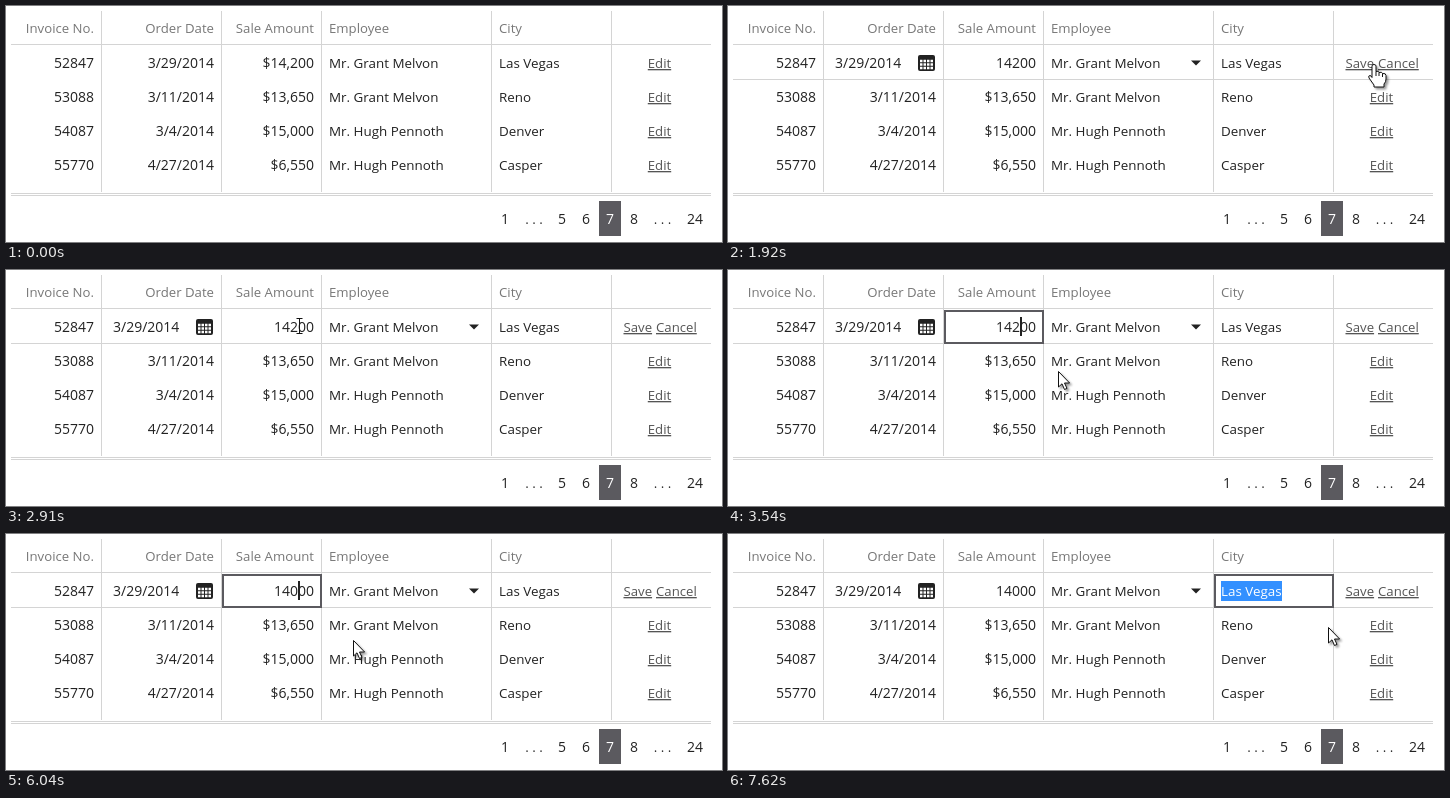
Write an HTML page that moves like this. It is 716 px wide and 236 px high and loops after 8 s.

```html
<!DOCTYPE html>
<html lang="en">
<head>
<meta charset="utf-8">
<title>Invoice grid</title>
<style>
html, body { margin: 0; width: 100%; height: 100%; overflow: hidden; background: #fff; }
svg { display: block; font: 13.4px "Open Sans", "Noto Sans", sans-serif; fill: #222; }
.num { font-size: 14px; }
.head { font-size: 13.2px; fill: #777; }
.link { font-size: 13.2px; fill: #555; text-decoration: underline 1px; text-underline-offset: 2px; }
.end { text-anchor: end; }
.mid { text-anchor: middle; }
.white { fill: #fff; }
.line { fill: none; stroke: #d4d4d4; shape-rendering: crispEdges; }
#focus { fill: none; stroke: #5b5a5f; stroke-width: 2; }
#cursor path { fill: #fff; stroke: #111; stroke-linejoin: round; }
#arrow, #hand { filter: drop-shadow(2px 2px 1px rgba(0, 0, 0, .4)); }
#cursor #beam { fill: none; }
</style>
</head>
<body>
<svg width="716" height="236" viewBox="0 0 716 236">
  <defs><clipPath id="clip"><rect id="clipBox" y="47" height="20"/></clipPath></defs>
  <path class="line" d="M95.5 5V186M215.5 5V186M315.5 5V186M485.5 5V186M605.5 5V186M5 38.5H705M5 187.5H705M5 189.5H705"/>
  <rect x="593" y="195" width="22" height="35" fill="#5b5a5f"/>
  <g id="table"></g>
  <g id="view"></g>
  <g id="edit">
    <path class="line" d="M5 73.5H705"/>
    <rect x="190" y="49" width="17" height="16" rx="2"/>
    <path d="M192 55h13M192 58.5h13M192 62h13" stroke="#fff" stroke-width="2.5" stroke-dasharray="2.5 1"/>
    <path d="M463 54.5h10l-5 5z"/>
  </g>
  <g id="selection" clip-path="url(#clip)">
    <rect x="493" y="47" width="61" height="20" fill="#3390ff"/>
  </g>
  <rect id="focus" y="41" height="32"/>
  <rect id="caret" x="292" y="47" width="2" height="19"/>
  <g id="cursor">
    <path id="arrow" d="M.5.5V16L4 12.8L6.5 18.5L9 17.4L6.5 12H11.6Z"/>
    <path id="hand" d="M-2 2Q-2 .5 0 .5T2 2V7.5Q5 6.5 5 8.5Q8 7.5 8.5 9.5Q12 9 12 11.5V15Q12 18 10 20V23H0V21L-5 14Q-6 11.5-4 11.5Q-3 11.5-2 13.5ZM2 7.5V12M5 8.5V12M8.5 9.5V13"/>
    <path id="beam" d="M-3-7.5H3M0-7.5V7.5M-3 7.5H3"/>
  </g>
</svg>
<script>
const $ = id => document.getElementById(id);

function text(parent, str, x, y, cls = '') {
  const el = document.createElementNS('http://www.w3.org/2000/svg', 'text');
  set(el, { x, y, class: cls });
  el.textContent = str;
  return $(parent).appendChild(el);
}
function set(el, attrs) {
  for (const name in attrs) el.setAttribute(name, attrs[name]);
}
const show = (id, on) => $(id).style.display = on ? '' : 'none';

text('table', 'Invoice No.', 88, 27, 'head end');
text('table', 'Order Date', 208, 27, 'head end');
text('table', 'Sale Amount', 308, 27, 'head end');
text('table', 'Employee', 323, 27, 'head');
text('table', 'City', 493, 27, 'head');

const grant = 'Mr. Grant Melvon', hugh = 'Mr. Hugh Pennoth';
[
  ['52847', '3/29/2014', '$14,200', grant, 'Las Vegas'],
  ['53088', '3/11/2014', '$13,650', grant, 'Reno'],
  ['54087', '3/4/2014', '$15,000', hugh, 'Denver'],
  ['55770', '4/27/2014', '$6,550', hugh, 'Casper']
].forEach(([id, date, amount, name, city], i) => {
  const y = 62 + 34 * i, group = i ? 'table' : 'view';
  text('table', id, 88, y, 'num end');
  text(group, date, 208, y, 'num end');
  text(group, amount, 308, y, 'num end');
  text('table', name, 323, y);
  text('table', city, 493, y);
  text(group, 'Edit', 653.5, y, 'link mid');
});

text('edit', '3/29/2014', 107, 62, 'num');
const amount = text('edit', '14200', 308, 62, 'num end');
text('edit', 'Save', 617.5, 62, 'link');
text('edit', 'Cancel', 650, 62, 'link');
const picked = text('selection', 'Las Vegas', 493, 62, 'white');

for (let page = 5; page <= 8; page++)
  text('table', page, 436 + 24 * page, 218, page === 7 ? 'num mid white' : 'num mid');
text('table', '1', 499, 218, 'num mid');
text('table', '24', 689, 218, 'num mid');
for (const x of [528, 656.5]) text('table', '. . .', x, 218, 'mid');

// Pointer moves: start, end, destination x and y, sideways bend
const moves = [
  [490, 1030, 658, 57, 0],
  [1900, 2910, 293, 56, 10],
  [3200, 3630, 332, 103, 0],
  [5800, 6040, 347, 106, 0],
  [6200, 6800, 563, 56, 0],
  [6900, 7250, 453, 56, 0],
  [7300, 7620, 600, 93, 0]
];

function pointer(t) {
  let x = 712, y = 131;
  for (const [start, end, toX, toY, bend] of moves) {
    if (t < start) break;
    const k = Math.min(1, (t - start) / (end - start));
    const ease = Math.sin(k * Math.PI / 2);
    x += (toX - x) * ease;
    y += (toY - y) * ease + bend * Math.sin(k * 2 * Math.PI);
  }
  return [Math.round(x), Math.round(y)];
}

function pointerShape(x, y, editing, dragging) {
  if (dragging) return 'beam';
  const inLink = editing ? x >= 617 && x <= 690 : x >= 642 && x <= 665;
  if (inLink && y > 48 && y < 67) return 'hand';
  const inField = x > 215 && x < 456 || x > 485 && x < 606;
  return editing && inField && y > 39 && y < 74 ? 'beam' : 'arrow';
}

function selectionStart(x) {
  for (let i = 0; i < picked.getNumberOfChars(); i++) {
    const left = picked.getStartPositionOfChar(i).x, right = picked.getEndPositionOfChar(i).x;
    if (x < (left + right) / 2) return left;
  }
  return 554;
}

const CLICK = 3135, ERASE = 4330, TYPE = 4590, DRAG = 6890, DROP = 7250;

function draw() {
  const t = performance.now() % 8000;
  const editing = t >= 1460, inCity = t >= DRAG;
  const [x, y] = pointer(t);

  show('view', !editing);
  show('edit', editing);
  amount.textContent = t < ERASE ? '14200' : t < TYPE ? '1400' : '14000';

  show('focus', t >= CLICK);
  set($('focus'), inCity ? { x: 487, width: 118 } : { x: 217, width: 98 });

  // The caret's blink restarts at every key
  const lastKey = t < ERASE ? CLICK : t < TYPE ? ERASE : TYPE;
  show('caret', t >= CLICK && !inCity && (t - lastKey) % 1000 < 500);

  const start = t < DROP ? selectionStart(x) : 493;
  show('selection', inCity);
  set($('clipBox'), { x: start, width: 554 - start });

  const shape = pointerShape(x, y, editing, inCity && t < DROP);
  for (const id of ['arrow', 'hand', 'beam']) show(id, id === shape);
  show('cursor', t >= 490);
  set($('cursor'), { transform: `translate(${shape === 'beam' ? x + .5 : x} ${y})` });
  requestAnimationFrame(draw);
}
draw();
</script>
</body>
</html>
```
